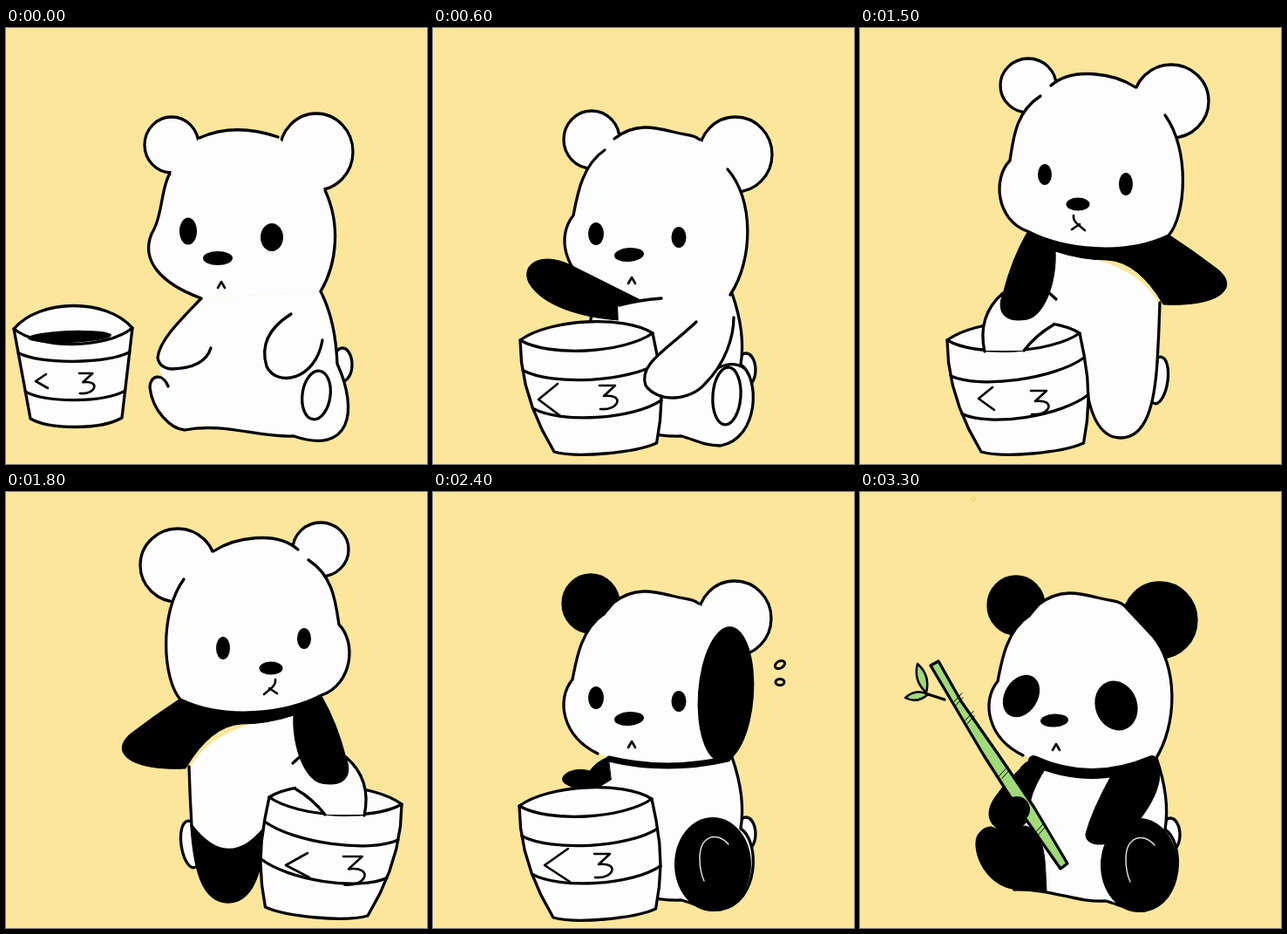
Animation, 483 px wide and 500 px high, one loop 3600 ms. Source, as an HTML page:

```html
<!DOCTYPE html>
<html lang="en">
<head>
<meta charset="utf-8">
<title>Bear and bucket</title>
<style>
  html, body { margin: 0; width: 100%; height: 100%; overflow: hidden; background: #fbe69b; }
  svg { display: block; width: 100vw; height: 100vh; }
  svg > g { visibility: hidden; }
</style>
</head>
<body>
<svg id="stage" viewBox="0 0 483 500" stroke-linecap="round" stroke-linejoin="round"></svg>
<script>
const WHITE = '#fdfdfd', BLACK = '#000', GREEN = '#a0da78', GREY = '#ddd';
const STEP = 300, PEN = 3.3;

// Drawing helpers
const path = (d, fill = 'none', w = PEN, color = BLACK) =>
  `<path d="${d}" fill="${fill}" stroke="${color}" stroke-width="${w}"/>`;
const ink = d => path(d, BLACK, 1);
const plain = d => path(d, WHITE, 0);
const oval = (x, y, rx, ry, turn = 0, fill = BLACK, w = 0) =>
  `<ellipse cx="${x}" cy="${y}" rx="${rx}" ry="${ry}" transform="rotate(${turn} ${x} ${y})" fill="${fill}" stroke="${BLACK}" stroke-width="${w}"/>`;
const ring = (x, y, rx, ry, turn = 0, fill = WHITE) => oval(x, y, rx, ry, turn, fill, PEN);
const move = (x, y, art) => `<g transform="translate(${x} ${y})">${art}</g>`;
const flip = art => `<g transform="translate(554 0) scale(-1 1)">${art}</g>`;
const mouth = (x, y) => path(`M${x - 4},${y + 7} L${x},${y} ${x + 4},${y + 7}`, 'none', 2.6);

// Buckets: two side profiles over t = 0..1, joined by sagging arcs
const TUB = {
  left: t => [100 + 39 * t * t, 358 + 128 * t],
  right: t => [252 + 10 * Math.sin(2.67 * t), 350 + 126 * t],
  back: 17, front: 16, bands: [0.27, 0.61], sag: 15, base: 7
};
const CUP = {
  left: t => [9 + 19 * t, 345 + 103 * t],
  right: t => [145 - 12 * t, 344 + 103 * t],
  back: 26, front: 18, bands: [0.27, 0.7], sag: 10, base: 10
};

function arc(a, b, sag) {
  const control = t => [a[0] + (b[0] - a[0]) * t, a[1] + (b[1] - a[1]) * t + sag * 4 / 3];
  return `C${control(0.22)} ${control(0.78)} ${b}`;
}

function bucket({ left, right, back, front, bands, sag, base }, slant = 0) {
  const steps = [0, 0.2, 0.4, 0.6, 0.8, 1];
  const down = steps.map(right).join(' ');
  const up = steps.map(t => left(1 - t)).join(' ');
  const across = (t, s, d) => path(`M${left(t + d)} ${arc(left(t + d), right(t - d), s)}`);
  return path(`M${left(0)} ${arc(left(0), right(0), -back)} L${down} ${arc(right(1), left(1), base)} L${up}Z`, WHITE) +
    across(0, front, 0) + bands.map(t => across(t, sag, slant)).join('');
}

const chevron = (x, y, w, h) => path(`M${x + w},${y - h} L${x},${y} ${x + w + 2},${y + h}`, 'none', 2.6);
const three = (x, y, k = 1) =>
  path(`M${x},${y} h${18 * k} l${-13 * k},${12 * k} c${24 * k},${-3 * k} ${18 * k},${17 * k} ${-4 * k},${15 * k}`, 'none', 2.6);
const wideLabel = () => chevron(121, 426, 22, 18) + three(191, 410);
const smallLabel = () => chevron(136, 425, 16, 13) + three(196, 416);
const lowLabel = () => chevron(128, 428, 27, 19) + three(185, 415);
const slantedTub = () => move(2, 3, bucket(TUB, 0.05));

// Seated bear
const crown = 'M208,127 C232,108 255,114 275,119 S298,122 306,128';
const cheekRight = 'C368,196 368,265 341,306';
const cheekLeft = 'C149,280 142,238 161,215 C165,195 170,158 197,140';

const head = (left = WHITE, right = WHITE) =>
  ring(182, 128, 32, 33, 0, left) + ring(347, 145, 42, 43, 0, right) +
  plain(`${crown} L338,162 ${cheekRight} Q265,325 190,300 ${cheekLeft}Z`) +
  path(`${crown} M338,162 ${cheekRight} M190,300 ${cheekLeft}`) +
  path((left === BLACK ? 'M197,140 L208,127' : '') + (right === BLACK ? 'M306,128 L338,162' : ''));

const torso = () => ring(359, 392, 11, 19) +
  path('M207,306 Q184,308 180,340 V455 C225,454 250,470 285,468 C300,472 310,479 330,479 C375,470 375,400 353,386 Q359,350 343,304', WHITE);
const paleFoot = () => path('M320,396 C328,386 345,382 357,390') + ring(337, 422, 16, 33, 4);
const blackFoot = () => oval(321, 427, 44, 54) + path('M339,404 C325,388 306,395 306,420 Q306,435 311,446', 'none', 1.5, GREY);
const neck = (w, sag) => path(`M202,306 Q268,${306 + 2 * sag} 338,306`, 'none', w);
const calmFace = () => oval(187, 236, 9, 13) + oval(282, 240, 8.5, 12) + oval(225, 260, 17, 8, -4) + mouth(228, 286);
const whiteArm = () => path('M302,337 C270,368 235,385 244,410 C258,430 295,428 312,408 C335,385 345,355 345,332', WHITE);
const restingArm = () => ink('M201,304 Q186,310 180,320 C160,314 142,326 151,334 Q168,345 186,341 L204,330Z');
const sweat = () => oval(398, 198, 6, 4, -30, 'none', 3) + oval(398, 218, 5, 3.5, 0, 'none', 3);
const halfPainted = () => torso() + paleFoot() + move(1, 0, head()) + neck(11, 11);

// Plain bear beside its cup
function sitting() {
  const top = 'M222,126 Q262,108 312,125';
  const right = 'C384,225 380,270 361,302';
  const left = 'C175,292 155,265 167,236 C180,215 178,182 188,167';
  return ring(386, 386, 11, 19) + plain('M224,310 L361,302 380,385 186,411 176,392Z') +
    path('M186,411 C180,395 165,398 165,412 C168,440 190,460 205,461 C250,452 290,470 330,468 C395,490 405,440 380,385 Q378,335 361,302', WHITE) +
    path('M224,310 C200,335 176,358 174,378 Q176,390 190,391 Q228,390 235,367', WHITE) +
    path('M327,328 C300,345 292,365 299,388 C310,412 355,405 363,358') + ring(356, 421, 16, 28, 8) +
    ring(190, 134, 31, 32) + ring(356, 142, 42, 44) +
    plain(`${top} L366,186 ${right} L224,310 ${left}Z`) + path(`${top} M366,186 ${right} M224,310 ${left}`) +
    oval(209, 233, 10, 15.5) + oval(305, 240, 13, 16) + oval(243, 264, 17, 8) + mouth(247, 291);
}

const cup = () => bucket(CUP) + oval(73, 354, 48, 7, -2) + chevron(34, 405, 12, 8) + three(84, 396, 0.85);

// Standing bear with one leg in the bucket on the right
function standing(legColor) {
  const top = 'M238,68 C262,52 310,44 335,66';
  const round = 'C375,96 378,125 382,152 C402,172 398,220 362,233 C320,255 250,262 200,238 C180,215 175,140 204,100';
  const crotch = 'Q255,437 213,383';
  return ring(212, 404, 11, 27, -8) +
    plain(`M211,317 Q235,268 330,256 L400,330 360,380 297,385 ${crotch}Z`) + path('M210,315 Q211,350 213,383') +
    path(`M213,383 C216,430 225,470 255,470 C288,470 295,420 297,385 ${legColor === BLACK ? crotch : ''}`, legColor) +
    flip(bucket(TUB, 0.05)) +
    plain('M329,311 L333,341 Q352,350 366,370 H411 Q420,330 390,304Z') +
    path('M333,341 Q352,352 366,370 M390,304 Q420,330 411,371 M329,311 L340,301') +
    ink('M200,237 Q172,255 142,278 C118,300 145,320 206,317 Q235,268 270,266 Q300,266 330,256 C328,290 342,330 362,334 C395,340 396,318 390,305 Q380,265 362,234Z') +
    ring(197, 84, 43, 42) + ring(361, 66, 32, 31) +
    plain(`${top} L347,78 ${round}Z`) + path(`${top} M347,78 ${round}`) +
    oval(249, 179, 8, 13) + oval(342, 168, 8, 12) + oval(304, 202, 13.5, 7.5) +
    path('M309,215 C310,222 303,226 296,232 M302,225 L311,231', 'none', 2.6);
}

// Painted panda and its bamboo
const panda = () => move(-3, 1, torso()) +
  ink('M150,384 C165,390 180,384 190,383 C215,390 212,430 214,457 L180,456 C140,452 126,405 136,392 Q142,384 150,384Z') +
  move(-1, 1, blackFoot()) +
  ink('M215,314 L198,306 Q172,325 155,350 C140,372 152,386 165,388 C188,390 198,375 195,356 Q200,335 215,314Z') +
  ink('M290,322 L341,306 C352,335 330,365 312,387 C300,405 258,412 259,392 Q266,365 290,322Z') +
  move(-3, 2, head(BLACK, BLACK) + neck(12, 15)) +
  oval(185, 234, 19, 26, 32) + oval(294, 245, 24, 29, -20) + oval(223, 262, 16, 7.5, -3) + mouth(225, 289);

function bamboo() {
  const leaf = (x1, y1, x2, y2, bx, by) => {
    const mx = (x1 + x2) / 2, my = (y1 + y2) / 2;
    return path(`M${x1},${y1} Q${mx + bx},${my + by} ${x2},${y2} Q${mx - bx},${my - by} ${x1},${y1}Z`, GREEN, 2.5);
  };
  const notch = t => {
    const x = 86 + 147 * t, y = 197 + 233 * t;
    return path(`M${x - 5},${y + 6} l11,-12 m1,5 l-8,9`, 'none', 1);
  };
  return path('M75,231 L97,238') + leaf(66, 197, 76, 230, 10, -3) + leaf(52, 236, 78, 232, 1, 9) +
    path('M81,199 L142,302 174,352 230,432 238,426 200,362 158,300 116,240 90,194Z', GREEN) +
    [0.17, 0.26, 0.53, 0.81].map(notch).join('') + oval(180, 364, 15, 15) +
    '<ellipse cx="130" cy="8" rx="2" ry="3" fill="none" stroke="#f0d560"/>';
}

const poses = [
  sitting() + cup(),

  torso() + paleFoot() + head() + calmFace() + bucket(TUB) + wideLabel() +
    path('M192,300 Q164,320 166,350 H198 Q200,330 216,318', WHITE) + path('M212,318 Q235,312 262,310') + whiteArm(),

  torso() + paleFoot() + head() + calmFace() +
    ink('M238,312 L158,272 C125,256 100,270 110,292 C124,318 170,332 213,335 L212,320Z') +
    plain('M212,319 L262,310 V340 H213Z') + path('M214,318 Q235,312 262,310') +
    bucket(TUB) + wideLabel() + whiteArm(),

  halfPainted() + calmFace() + slantedTub() + smallLabel() + restingArm() +
    path('M304,324 Q250,335 224,354 Q255,372 300,376 Q335,365 344,334', WHITE),

  halfPainted() +
    ink('M303,316 L340,303 Q375,292 398,291 C418,292 411,312 402,322 Q385,340 353,355 Q325,342 303,316Z') +
    path('M355,352 V386', 'none', 4) +
    oval(212, 231, 7, 11, 8) + oval(292, 249, 8, 12, 8) + oval(242, 264, 12.5, 6.5) + mouth(242, 282) +
    slantedTub() + smallLabel() + restingArm(),

  flip(standing(WHITE)) + smallLabel(),

  standing(BLACK) + chevron(321, 428, 25, 14) + three(387, 418, 1.2),

  torso() + move(-1, 0, head()) + neck(6, 4) +
    oval(293, 243, 9, 13) + oval(240, 261, 14, 7) + path('M206,236 L214,239', 'none', 4) + mouth(239, 290) +
    oval(173, 232, 32, 80, -4) + move(-1, 0, bucket(TUB)) + chevron(121, 425, 22, 19) + three(187, 412) +
    oval(321, 432, 42, 47) +
    ink('M303,314 L342,304 Q360,345 355,390 C330,395 300,424 265,424 C235,422 235,402 245,393 Q280,360 303,314Z') +
    path('M320,397 Q302,415 283,422 M330,404 C305,412 305,440 318,456', 'none', 1, GREY) + sweat(),

  torso() + blackFoot() + move(-1, 0, head(BLACK)) + neck(7, 8) + calmFace() +
    oval(336, 232, 32, 78, 4) + restingArm() + move(-1, 2, bucket(TUB)) + lowLabel() + sweat(),

  torso() + blackFoot() + move(-1, 0, head(BLACK, BLACK)) + neck(8, 12) +
    oval(225, 260, 17, 8) + mouth(227, 287) +
    oval(176, 279, 31, 58, 9) + oval(296, 287, 31, 60, -11) +
    move(-1, 2, bucket(TUB)) + lowLabel(),

  panda() + move(0, 4, bucket(TUB) + wideLabel()),

  panda() + bamboo()
];

const stage = document.getElementById('stage');
stage.innerHTML = poses.map(art => `<g>${art}</g>`).join('');
const groups = [...stage.children];
const start = performance.now();

function draw() {
  const current = Math.floor((performance.now() - start) / STEP) % groups.length;
  groups.forEach((g, i) => { g.style.visibility = i === current ? 'visible' : 'hidden'; });
  requestAnimationFrame(draw);
}
draw();
</script>
</body>
</html>
```
